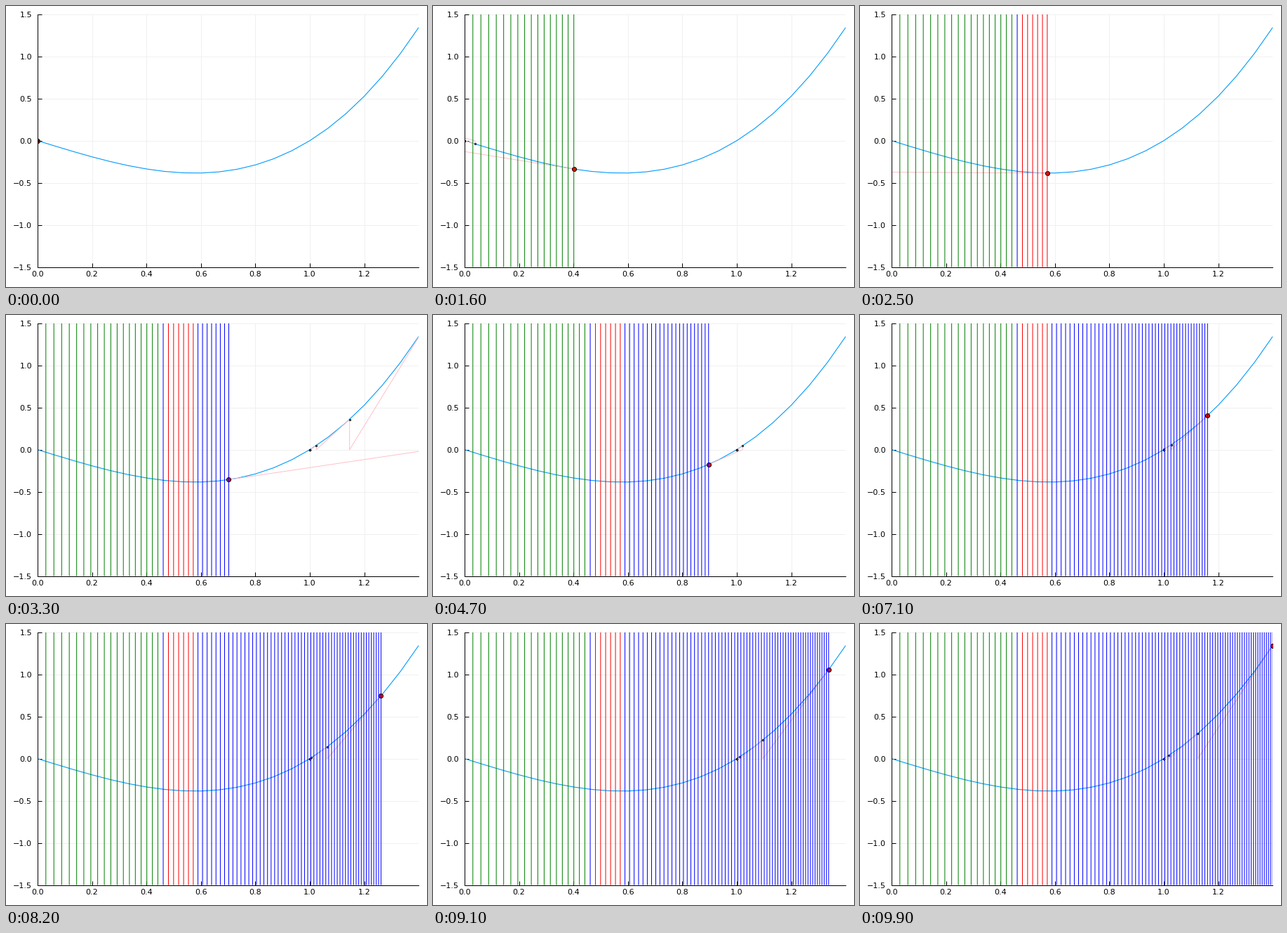
Recreate the animation shown at these times as a matplotlib script. Size 600x400 px, loop 10 s.

```python
import numpy as np
import matplotlib.pyplot as plt
from matplotlib.animation import FuncAnimation
from matplotlib.collections import LineCollection

FRAMES = 100
STEPS = 25
PX = 0.72  # points per pixel at 100 dpi
ROOT_COLORS = {-1: "red", 0: "green", 1: "blue"}

plt.rcParams["font.family"] = "DejaVu Sans"


def f(x):
    return x**3 - x


def newton(x):
    """Iterates of Newton's method, starting with x itself."""
    xs = [x]
    for _ in range(STEPS):
        x -= f(x) / (3 * x**2 - 1)
        xs.append(x)
    return np.array(xs)


def zigzag(xs):
    """Tangent down to the axis, then up to the curve, for each step."""
    px = np.repeat(xs, 2)[1:]
    py = np.zeros_like(px)
    py[::2] = f(xs)
    return px, py


starts = np.log(np.linspace(1, np.exp(1.4), FRAMES))
orbits = [newton(x) for x in starts]
colors = [ROOT_COLORS[int(round(xs[-1]))] for xs in orbits]
bars = [[(x, -1.5), (x, 1.5)] for x in starts]

fig = plt.figure(figsize=(6, 4), dpi=100, facecolor="white")
ax = fig.add_axes([45 / 600, 28.4 / 400, 543.2 / 600, 359.8 / 400])
ax.set(xlim=(0, 1.4), ylim=(-1.5, 1.5))

xticks = np.arange(0, 1.3, 0.2)
yticks = np.arange(-1.5, 1.6, 0.5)
ax.set_xticks(xticks, [f"{t:.1f}" for t in xticks])
ax.set_yticks(yticks, [f"{t:.1f}".replace("-", "\u2212") for t in yticks])
ax.tick_params(direction="in", length=6 * PX, width=PX, labelsize=8)
ax.tick_params(axis="x", pad=5 * PX)
ax.tick_params(axis="y", pad=8 * PX)
ax.grid(color="#f0f0f0", linewidth=PX)
ax.set_axisbelow(True)
for side in ("top", "right"):
    ax.spines[side].set_visible(False)
for side in ("left", "bottom"):
    ax.spines[side].set_linewidth(PX)
    ax.spines[side].set_zorder(8)

grid = np.linspace(0, 1.4, 22)
ax.plot(grid, f(grid), color="#009afa", lw=1.1 * PX, zorder=2)
path, = ax.plot([], [], color="pink", lw=PX, zorder=3)
head, = ax.plot([], [], "o", ms=6 * PX, mfc="red", mec="black",
                mew=PX, zorder=4)
dots, = ax.plot([], [], "o", ms=2.2 * PX, mfc="#999999", mec="black",
                mew=0.9 * PX, zorder=5)
lines = LineCollection([], linewidths=PX, zorder=6)
lines.set_snap(False)
ax.add_collection(lines, autolim=False)


def update(i):
    xs = orbits[i]
    path.set_data(*zigzag(xs))
    head.set_data(xs[:1], f(xs[:1]))
    dots.set_data(xs[1:], f(xs[1:]))
    lines.set_segments(bars[:i + 1])
    lines.set_color(colors[:i + 1])
    return path, head, dots, lines


anim = FuncAnimation(fig, update, frames=FRAMES, interval=100,
                     repeat=True, repeat_delay=0, blit=False)
plt.show()
```
